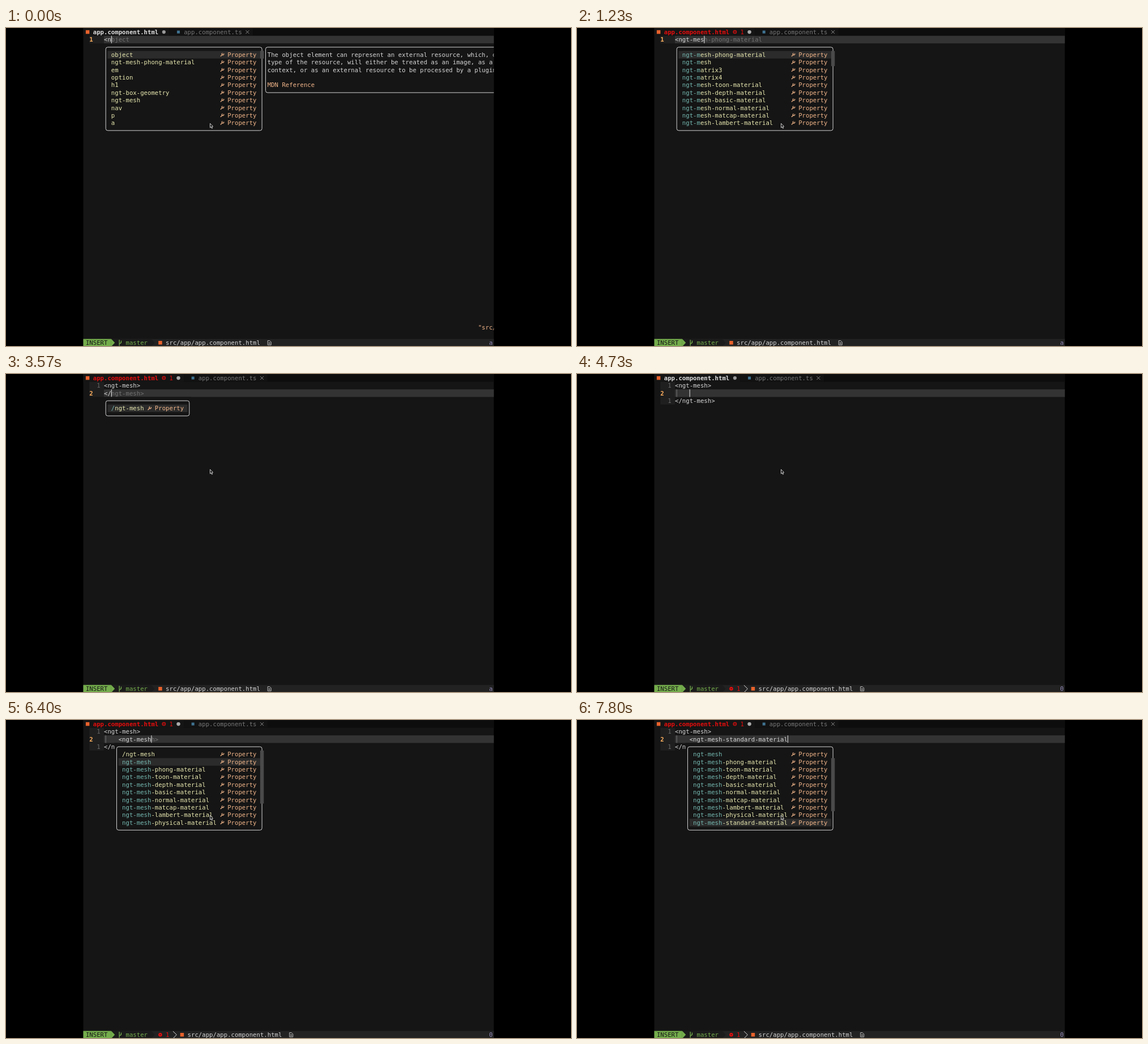
An HTML page with a canvas that plays this animation: 998x561 px, repeating every 8000 ms.

```html
<!DOCTYPE html>
<html lang="en">
<head>
<meta charset="utf-8">
<title>Editor completion</title>
<style>
  html, body { margin: 0; height: 100%; overflow: hidden; background: #000; }
  canvas { display: block; }
</style>
</head>
<body>
<canvas id="stage" width="998" height="561"></canvas>
<script>
const ctx = document.getElementById('stage').getContext('2d');
const LOOP = 8000, CELL = 6.417, LINE = 13.37;
const FONT = '10.66px "DejaVu Sans Mono", monospace';
const X = col => 134.5 + col * CELL;
const Y = row => 0.4 + row * LINE;

const C = {
  bg: '#151515', line: '#333', gutter: '#1f1f1f', text: '#d6d6d6', ghost: '#727272',
  item: '#e8e8b0', match: '#74b8b0', peach: '#f2b68a', border: '#d4d4d4', pick: '#2b2b2b',
  bar: '#4a4a4a', red: '#e60d0d', orange: '#e8622c', green: '#74ad4c', number: '#ffaf5f'
};

// Completion lists
const mesh = 'ngt-mesh', close = '/ngt-mesh';
const materials = 'phong toon depth basic normal matcap lambert physical standard'
  .split(' ').map(m => `${mesh}-${m}-material`);
const [phong, ...others] = materials;
const box = 'ngt-box-geometry';
const objects = 'lOD fog bone line audio scene group'.split(' ').map(n => 'ngt-' + n);
const matrices = ['ngt-matrix3', 'ngt-matrix4'];
const meshes = [mesh, ...materials];
const tags = ['em', 'option', 'h1', box];

// width: columns from the item name to its kind; bar: first row and length of the scrollbar
const menu = (items, match, width = 32, bar = [0, 1], sel = 0, scroll = 0) =>
  ({ menu: { items, match, width, bar, sel, scroll }, ghost: null });
const type = (...lines) => ({ lines });

const firstN = [phong, box, mesh, 'nav', ...objects];
const firstNgt = [phong, box, mesh, ...objects];
const firstM = [phong, mesh, ...matrices, ...others];
const opening = [close, mesh, phong, 'object', ...tags, 'nav', 'p'];
const secondNgt = [close, mesh, phong, box, ...objects];
const secondM = [close, mesh, phong, ...matrices, ...others];
const secondMesh = [close, ...meshes];
const inner = text => type('<ngt-mesh>', '    ' + text, '</ngt-mesh>');

const steps = [
  [0, { ...type('<n'), row: 0, mode: 'INSERT', doc: true, message: true, tabError: false, barError: false,
        ...menu(['object', phong, ...tags, mesh, 'nav', 'p', 'a'], 0) }],
  [30, { ...menu(firstN, 1), doc: false }],
  [130, { message: false }],
  [200, type('<ng')],
  [270, menu(firstNgt, 2)],
  [400, type('<ngt')],
  [470, menu(firstNgt, 3)],
  [600, type('<ngt-')],
  [870, { ...menu(firstNgt, 4), tabError: true }],
  [970, type('<ngt-m')],
  [1070, menu(firstM, 5, 32, [0, 2])],
  [1130, type('<ngt-me')],
  [1230, type('<ngt-mes')],
  [1270, menu([phong, mesh, ...others], 7, 29, [0, 8])],
  [1330, type('<ngt-mesh')],
  [1370, menu(meshes, 8, 29, [0, 8])],
  [1630, { ...type('<' + phong), ...menu(meshes, 8, 29, [0, 8], 1), ghost: '' }],
  [2100, { ...type('<ngt-mesh'), ...menu(meshes, 8, 29, [0, 8]), ghost: '' }],
  [2400, { menu: null }],
  [2700, type('<ngt-mesh>')],
  [3030, { ...type('<ngt-mesh>', ''), row: 1 }],
  [3230, type('<ngt-mesh>', '<')],
  [3300, menu(opening, 0)],
  [3470, type('<ngt-mesh>', '</')],
  [3570, menu([close], 1, 12, null)],
  [3930, { ...type('<ngt-mesh>', '</ngt-mesh>'), menu: null }],
  [4170, { mode: 'NORMAL', barError: true }],
  [4300, { tabError: false }],
  [4570, { ...type('<ngt-mesh>', '', '</ngt-mesh>'), mode: 'INSERT' }],
  [4730, inner('')],
  [4900, inner('<')],
  [4970, menu(opening, 0, 33)],
  [5100, inner('<n')],
  [5170, menu(secondNgt, 1, 33)],
  [5270, inner('<ng')],
  [5330, menu(secondNgt, 2, 33)],
  [5400, inner('<ngt')],
  [5470, menu(secondNgt, 3, 33)],
  [5530, inner('<ngt-')],
  [5600, menu(secondNgt, 4, 33)],
  [5670, inner('<ngt-m')],
  [5730, menu(secondM, 5, 33, [0, 2])],
  [5800, inner('<ngt-me')],
  [5870, { ...inner('<ngt-mes'), ...menu(secondMesh, 6, 29, [0, 7]) }],
  [5930, inner('<ngt-mesh')],
  [5970, menu(secondMesh, 8, 29, [0, 7])],
  [6200, { tabError: true }],
  ...[6400, 6570, 6730, 6830, 7000, 7170, 7300, 7470, 7630, 7800].map((t, i) => {
    const sel = i + 1, scroll = Math.max(0, sel - 9);
    return [t, { ...inner('<' + secondMesh[sel]),
                 ...menu(secondMesh, 8, 29, [scroll, 7], sel, scroll), ghost: i ? '' : 'h>' }];
  }),
  [6430, { ghost: '' }]
].sort((a, b) => a[0] - b[0]);

// Drawing helpers, in cells
function put(text, col, row, color, weight = '') {
  ctx.font = weight + ' ' + FONT;
  ctx.fillStyle = color;
  [...text].forEach((ch, i) => ctx.fillText(ch, X(col + i), Y(row) + 10.4));
}
function fill(col, row, cols, rows, color) {
  ctx.fillStyle = color;
  ctx.fillRect(X(col), Y(row), cols * CELL, rows * LINE);
}
function path(points, color, solid, width = 1) {
  ctx.beginPath();
  points.forEach(([x, y]) => ctx.lineTo(x, y));
  ctx.lineWidth = width;
  ctx.strokeStyle = ctx.fillStyle = color;
  solid ? ctx.fill() : ctx.stroke();
}
function disc(col, row, r, color, ring) {
  ctx.beginPath();
  ctx.arc(X(col + .5), Y(row + .5), r, 0, 7);
  ctx.lineWidth = 1.1;
  ctx.fillStyle = ctx.strokeStyle = color;
  ring ? ctx.stroke() : ctx.fill();
}
function square(col, row, size, color) {
  ctx.fillStyle = color;
  ctx.fillRect(X(col + .5) - size / 2, Y(row + .5) - size / 2, size, size);
}
function frame(left, top, right, bottom) {
  const x = X(left + .5), y = Y(top + .5);
  fill(left, top, right - left + 1, bottom - top + 1, C.bg);
  ctx.beginPath();
  ctx.roundRect(x, y, X(right + .5) - x, Y(bottom + .5) - y, 3.5);
  ctx.lineWidth = 1;
  ctx.strokeStyle = C.border;
  ctx.stroke();
}
function wrench(col, row) {
  const x = X(col), y = Y(row);
  path([[x + .6, y + 9.6], [x + 4, y + 6]], C.peach, false, 1.3);
  ctx.beginPath();
  ctx.arc(x + 4.7, y + 5.4, 1.7, -.6, 4.4);
  ctx.stroke();
}

function drawTabs({ tabError }) {
  const shift = tabError ? 4 : 0;
  fill(0, 0, 115, 1, '#0d0d0d');
  fill(0, 0, 24 + shift, 1, C.bg);
  fill(24 + shift, 0, 23, 1, '#121212');
  square(1, 0, 6.5, C.orange);
  put('app.component.html', 3, 0, tabError ? C.red : '#dedede', 'bold');
  if (tabError) {
    disc(22, 0, 2.7, C.red, true);
    square(22, 0, 1.6, C.red);
    put('1', 24, 0, C.red);
  }
  disc(22 + shift, 0, 3.1, '#999');
  if (tabError) {
    fill(22, 0, 1, 1, C.bg);
    disc(22, 0, 2.7, C.red, true);
    square(22, 0, 1.6, C.red);
    disc(26, 0, 3.1, '#aaa');
  }
  square(26 + shift, 0, 5, '#3f7391');
  put('app.component.ts', 28 + shift, 0, '#777');
  const x = X(45.5 + shift), y = Y(.5);
  path([[x - 3, y - 3], [x + 3, y + 3]], '#888');
  path([[x - 3, y + 3], [x + 3, y - 3]], '#888');
}

function drawText({ lines, row, mode, menu, ghost }) {
  lines.forEach((line, i) => {
    const r = i + 1, active = i === row;
    fill(2, r, 4, 1, C.gutter);
    if (active) fill(6, r, 108, 1, C.line);
    if (active) put(String(r), 2, r, C.number, 'bold');
    else put(String(Math.abs(i - row)), 4, r, '#686868');
    put(line, 6, r, C.text);
    if (line[0] === ' ') path([[X(6.5), Y(r)], [X(6.5), Y(r + 1)]], '#777');
    if (!active) return;
    const end = 6 + line.length;
    if (menu) {
      const first = menu.items[0] + (menu.items[0] === close ? '>' : '');
      put(ghost ?? first.slice(line.trim().length - 1), end, r, C.ghost);
    }
    if (mode === 'NORMAL') {
      fill(end - 1, r, 1, 1, C.text);
      put(line.slice(-1), end - 1, r, C.bg);
    } else {
      ctx.fillStyle = '#e4e4e4';
      ctx.fillRect(X(end), Y(r), 1, LINE);
    }
  });
}

function drawMenu({ lines, row, menu, doc }) {
  if (!menu) return;
  const { items, match, width, bar, sel, scroll } = menu;
  const left = lines[row][0] === ' ' ? 9 : 6, top = row + 2;
  const kind = left + 2 + width, right = kind + 9;
  const shown = items.slice(scroll, scroll + 10);
  const prefix = lines[row].trim().slice(1, 1 + match);
  frame(left, top, right, top + shown.length + 1);
  shown.forEach((name, i) => {
    const r = top + 1 + i, hit = name.startsWith(prefix) ? match : 0;
    if (i + scroll === sel) fill(left + 1, r, right - left - 1, 1, C.pick);
    put(name, left + 2, r, C.item);
    if (hit) {
      fill(left + 2, r, hit, 1, i + scroll === sel ? C.pick : C.bg);
      put(name.slice(0, hit), left + 2, r, C.match);
    }
    wrench(kind - 2, r);
    put('Property', kind, r, C.peach);
  });
  if (bar) fill(right, top + 1 + bar[0], 1, bar[1], C.bar);
  if (!doc) return;
  frame(50, 2, 130, 8);
  put('The object element can represent an external resource, which, depending', 51, 3, C.text);
  put('type of the resource, will either be treated as an image, as a nested', 51, 4, C.text);
  put('context, or as an external resource to be processed by a plugin.', 51, 5, C.text);
  put('MDN Reference', 51, 7, C.peach);
  fill(49, 3, 1, 1, C.bar);
}

function drawStatus({ mode, barError }) {
  const r = 41, y = Y(r), shift = barError ? 6 : 0;
  const color = mode === 'INSERT' ? C.green : '#6a9fd8';
  fill(0, r, 115, 1, '#222');
  fill(0, r, 19, 1, '#1b1b1b');
  path([[X(19), y], [X(20), y + LINE / 2], [X(19), y + LINE]], '#1b1b1b', true);
  fill(0, r, 8, 1, color);
  path([[X(8), y], [X(9), y + LINE / 2], [X(8), y + LINE]], color, true);
  put(mode, 1, r, '#151515');

  const bx = X(10);
  path([[bx + 1.5, y + 1.5], [bx + 1.5, y + 12]], C.green, false, 1.3);
  path([[bx + 1.5, y + 8.5], [bx + 4.8, y + 6.5], [bx + 4.8, y + 3]], C.green, false, 1.3);
  put('master', 12, r, C.green);

  if (barError) {
    disc(21, r, 3.2, C.red);
    square(21, r, 1.8, '#222');
    put('1', 23, r, C.red);
    path([[X(25), y + .5], [X(26), y + LINE / 2], [X(25), y + LINE]], C.text);
  }
  square(21 + shift, r, 6.5, C.orange);
  put('src/app/app.component.html', 23 + shift, r, C.text);

  const fx = X(51 + shift) + .5, fy = y + 3;
  path([[fx, fy], [fx + 3.5, fy], [fx + 6, fy + 2.5], [fx + 6, fy + 7.5], [fx, fy + 7.5], [fx, fy]], '#bbb');
  path([[fx + 1.5, fy + 3.5], [fx + 4.5, fy + 3.5]], '#bbb');
  path([[fx + 1.5, fy + 5.5], [fx + 4.5, fy + 5.5]], '#bbb');
  put(barError ? '0' : 'a', 112, r, '#8f86b5');
}

function drawPointer() {
  const shape = [[0, 0], [0, 7.6], [1.8, 6], [3, 8.8], [4.2, 8.3], [3, 5.6], [5.2, 5.4], [0, 0]]
    .map(([x, y]) => [360.5 + x, 168.3 + y]);
  path(shape, '#111', true);
  path(shape, '#ddd', false, .9);
}

function draw(now) {
  const t = now % LOOP;
  const state = Object.assign({}, ...steps.filter(s => s[0] <= t).map(s => s[1]));
  ctx.fillStyle = '#000';
  ctx.fillRect(0, 0, 998, 561);
  ctx.save();
  ctx.beginPath();
  ctx.rect(136.5, 0, 725.2, 561);
  ctx.clip();
  ctx.fillStyle = C.bg;
  ctx.fillRect(136, 0, 726, 561);
  drawTabs(state);
  drawText(state);
  drawMenu(state);
  if (state.message) put('"src/app', 109, 39, C.peach);
  drawStatus(state);
  drawPointer();
  ctx.restore();
  requestAnimationFrame(loop);
}

const start = performance.now();
const loop = () => draw(performance.now() - start);
loop();
</script>
</body>
</html>
```
